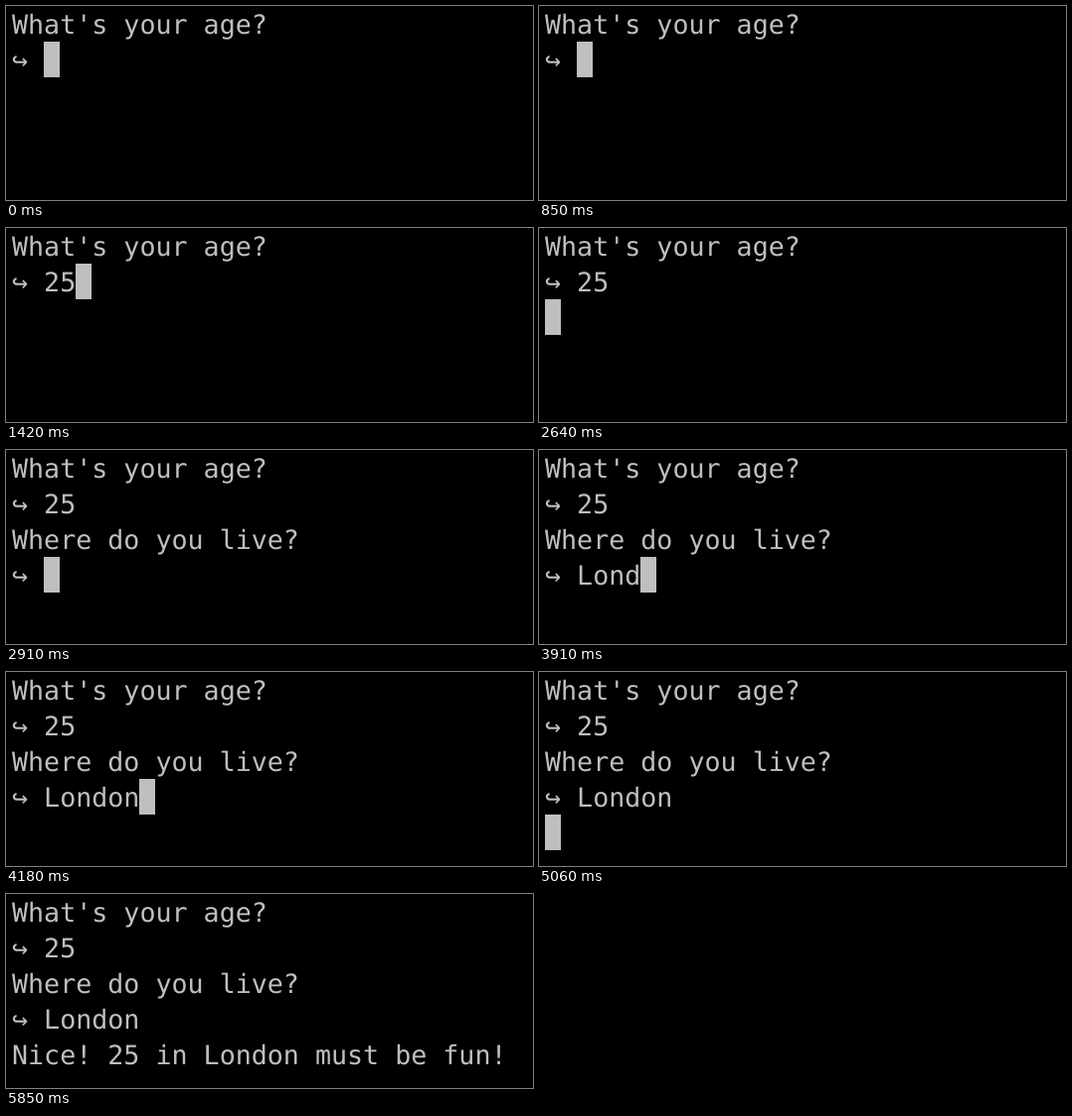
Write an HTML page with a canvas that moves like this. It is 530 by 196 pixels and loops after 8210 ms.

```html
<!DOCTYPE html>
<html lang="en">
<head>
<meta charset="utf-8">
<title>Terminal prompt</title>
<style>
  html, body { margin: 0; width: 100%; height: 100%; overflow: hidden; background: #000; }
  canvas { display: block; }
</style>
</head>
<body>
<canvas id="screen" width="530" height="196"></canvas>
<script>
const ctx = document.getElementById("screen").getContext("2d");
const LOOP = 8210;
const LEFT = 6, CELL = 16, LINE = 36, BASELINE = 28;
const INK = "#bfbfbf";

// Each event appends text at its time; "\n" moves the cursor down.
const EVENTS = [
  [0, "What's your age?\n↪ "],
  [1360, "2"],
  [1420, "5"],
  [2640, "\n"],
  [2670, "Where do you live?\n↪ "],
  [3520, "L"],
  [3730, "o"],
  [3850, "n"],
  [3910, "d"],
  [4030, "o"],
  [4180, "n"],
  [5060, "\n"],
  [5090, "Nice! 25 in London must be fun!\n"],
];
const CURSOR_OFF = 5120;

function draw(time) {
  const lines = EVENTS.filter(([at]) => at <= time)
    .map(([, text]) => text).join("").split("\n");

  ctx.fillStyle = "#000";
  ctx.fillRect(0, 0, 530, 196);

  ctx.fillStyle = INK;
  ctx.font = '26.667px "DejaVu Sans Mono", monospace';
  ctx.textRendering = "geometricPrecision"; // fractional glyph advances
  lines.forEach((line, row) => ctx.fillText(line, LEFT, row * LINE + BASELINE));

  if (time < CURSOR_OFF) {
    const row = lines.length - 1;
    ctx.fillRect(LEFT + lines[row].length * CELL, row * LINE, CELL, LINE);
  }
}

const start = performance.now();
function tick() {
  draw((performance.now() - start) % LOOP);
  requestAnimationFrame(tick);
}
tick();
</script>
</body>
</html>
```
